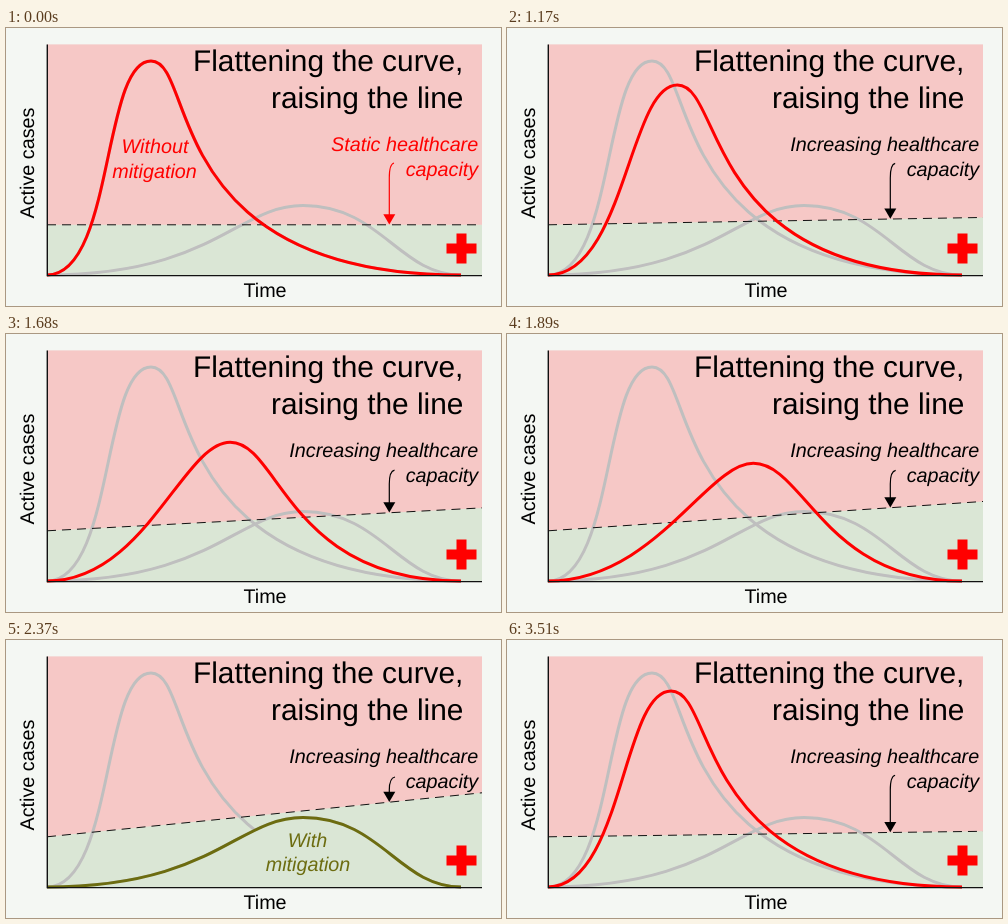
An HTML page for the animation above (3.54 s loop, 495 px wide and 278 px high).

```html
<!DOCTYPE html>
<html lang="en">
<head>
<meta charset="utf-8">
<title>Flattening the curve, raising the line</title>
<style>
  html, body { margin: 0; height: 100%; overflow: hidden; background: #f4f7f3; }
  svg { display: block; width: 100%; height: 100%; }
  text { font: 19.75px "Liberation Sans", Arial, sans-serif; text-rendering: geometricPrecision; }
  .title { font-size: 29.85px; text-anchor: end; }
  .note { font-style: italic; text-anchor: end; }
  .mid { text-anchor: middle; }
  .label { font-style: italic; text-anchor: middle; }
  .curve { fill: none; stroke-width: 3; }
  .past { stroke: #bfbfbf; }
</style>
</head>
<body>
<svg viewBox="0 0 495 278">
  <rect x="41" y="16.4" width="435" height="231" fill="#f6c8c6"/>
  <path id="zone" fill="#dae6d5"/>
  <path id="high" class="curve past"/>
  <path id="low" class="curve past"/>
  <path id="limit" stroke="#111" stroke-dasharray="9 6"/>
  <path id="now" stroke-width="3"/>
  <path d="M41.3 16.4V247.6H476" fill="none" stroke="#111" stroke-width="1.4"/>
  <path d="M440.5 220.5h30M455.5 205.5v30" stroke="#f00" stroke-width="10"/>

  <text class="title" x="457.4" y="42.6">Flattening the curve,</text>
  <text class="title" x="457.4" y="80">raising the line</text>
  <g id="capacity">
    <text class="note" id="kind" x="472.2" y="122.7"></text>
    <text class="note" x="472.2" y="147.5">capacity</text>
    <path id="stem" fill="none" stroke-width="1.2"/>
    <path id="head"/>
  </g>
  <g id="without" fill="#f00">
    <text class="label" x="149" y="124.5">Without</text>
    <text class="label" x="148.5" y="149.5">mitigation</text>
  </g>
  <g id="with" fill="#6c6c10">
    <text class="label" x="301.5" y="206.5">With</text>
    <text class="label" x="302" y="231.3">mitigation</text>
  </g>
  <text class="mid" x="259" y="269">Time</text>
  <text class="mid" transform="translate(28 135) rotate(-90)">Active cases</text>
</svg>
<script>
const LOOP = 3540, STEP = 30, FALL = 960, RISE = 3330;
const $ = id => document.getElementById(id);
const set = (id, attrs) => {
  for (const key in attrs) $(id).setAttribute(key, attrs[key]);
};
const show = (id, on) => set(id, { visibility: on ? "visible" : "hidden" });

// Peak position, then the x of the four handles; all handles are horizontal
const high = [145, 33, 108, 96, 191, 153];
const low = [297, 177.5, 207, 231, 375, 393];
const pointed = [297, 177.5, 167, 252, 350, 400]; // what the moving curve heads for
const curve = ([x, y, a, b, c, d]) =>
  `M41 247C${a} 247 ${b} ${y} ${x} ${y}C${c} ${y} ${d} 247 455 247`;
const mix = p => high.map((v, i) => v + (pointed[i] - v) * p);

// 0 = unmitigated, 1 = fully flattened
function progress(t) {
  const steps = from => Math.floor((t - from) / STEP) + 1;
  if (t < FALL) return 0;
  if (t < RISE) return Math.min(1, steps(FALL) / 48);
  return 1 - steps(RISE) / 8;
}

function draw(p) {
  const start = p === 0, end = p === 1;
  const base = 196.8, right = base - 44 * p;
  const tip = base - 34.6 * p - 0.3;
  const tone = start ? "#f00" : "#000";

  set("zone", { d: `M41 ${base}L476 ${right}V247.4H41Z` });
  set("limit", { d: `M41 ${base}L476 ${right}` });
  set("now", {
    d: curve(end ? low : mix(p)),
    stroke: end ? "#6c6c10" : "#f00",
    fill: end ? "#dae6d5" : "none"
  });
  set("capacity", { fill: tone });
  set("stem", {
    d: `M${388 + p} ${135 + 2 * p}Q383.3 ${136 + 2 * p} 383.3 150V${tip - 8}`,
    stroke: tone
  });
  set("head", { d: `M383.3 ${tip}l-6-10.2h12Z` });
  $("kind").textContent = (start ? "Static" : "Increasing") + " healthcare";
  show("without", start);
  show("with", end);
}

set("high", { d: curve(high) });
set("low", { d: curve(low) });

const origin = performance.now();
function tick() {
  draw(progress((performance.now() - origin) % LOOP));
  requestAnimationFrame(tick);
}
tick();
</script>
</body>
</html>
```
